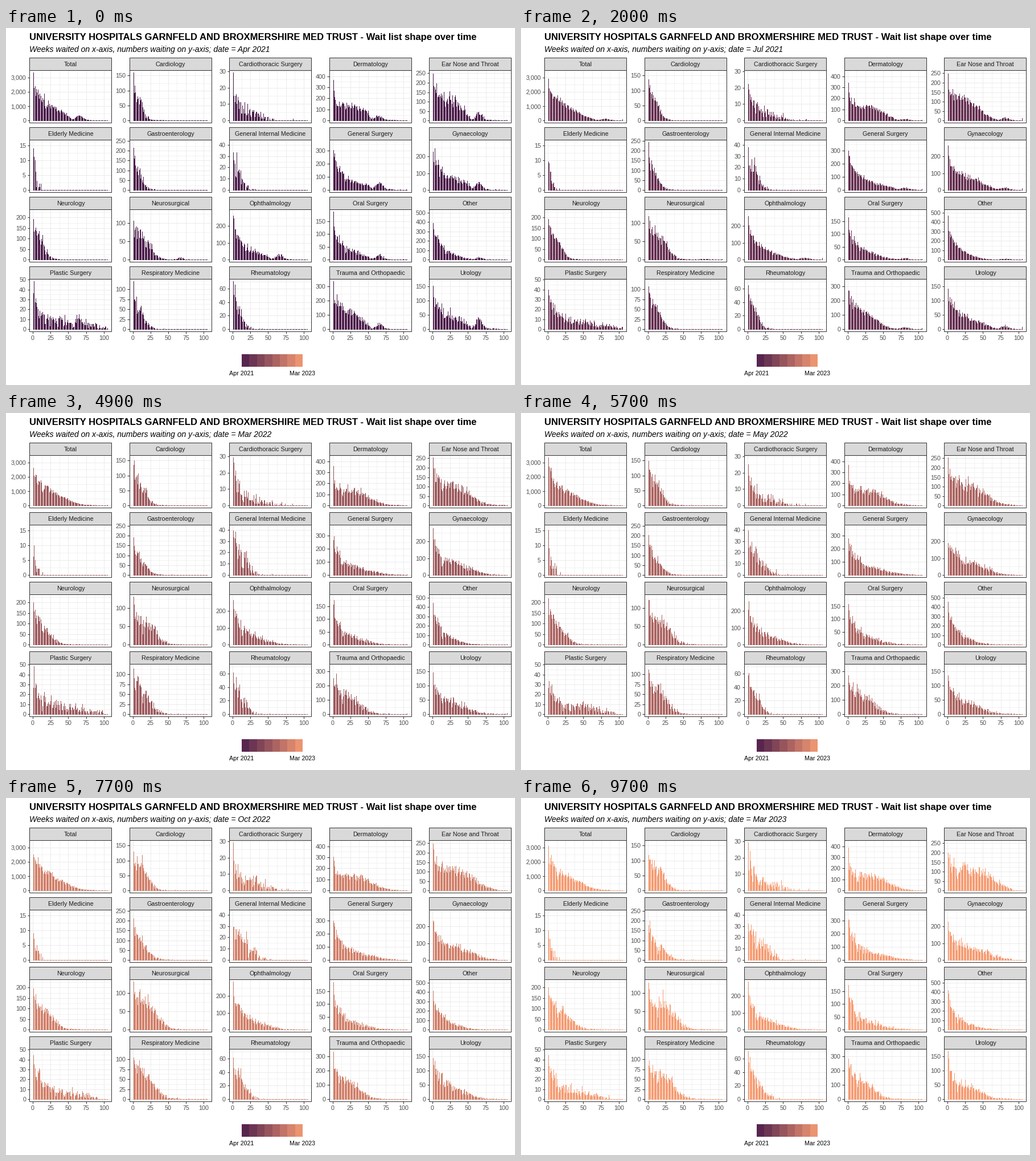
A matplotlib script that plays this animation: 894 px wide and 626 px high, repeating every 10000 ms.

```python
import numpy as np
import matplotlib.pyplot as plt
from matplotlib.animation import FuncAnimation
from matplotlib.collections import LineCollection, PolyCollection
from matplotlib.patches import Rectangle

WIDTH, HEIGHT, DPI = 894, 626, 64
PX = 72 / DPI
FONT = "Liberation Sans"
DARK, LIGHT = np.array([76, 29, 75]) / 255, np.array([246, 156, 115]) / 255
MONTHS = "Jan Feb Mar Apr May Jun Jul Aug Sep Oct Nov Dec".split()
TITLE = ("UNIVERSITY HOSPITALS GARNFELD AND BROXMERSHIRE MED TRUST"
         " - Wait list shape over time")
SUBTITLE = "Weeks waited on x-axis, numbers waiting on y-axis; date = "

PANEL_W, PANEL_H, STRIP_H = 144, 92, 22
WEEK_PX = 1.247
STATES = 24
WEEKS = np.arange(1, 106)
WEEKS_PER_MONTH = 4.345

# The first frame of each change shows the halfway point.
CHANGES = [5, 10, 15, *range(20, 97, 4)]

fig = plt.figure(figsize=(WIDTH / DPI, HEIGHT / DPI), dpi=DPI, facecolor="white")
ax = fig.add_axes([0, 0, 1, 1])
ax.set(xlim=(0, WIDTH), ylim=(HEIGHT, 0))
ax.axis("off")

panels = []
rng = np.random.default_rng(12)


def text(x, y, s, size, color="black", ha="center", **kw):
    return ax.text(x, y, s, fontsize=size * PX, color=color, ha=ha,
                   va="baseline", family=FONT, **kw)


def lines(segments, color, width, z):
    ax.add_collection(LineCollection(segments, colors=color,
                                     linewidths=width * PX, zorder=z), autolim=False)


def box(x, y, w, h, fill, z):
    ax.add_patch(Rectangle((x, y), w, h, facecolor=fill, edgecolor="#333333",
                           linewidth=PX, zorder=z))


def bell(x, width):
    return np.exp(-(x / width) ** 2)


def wait_counts(top, decay, plateau, spans, hump):
    """Counts by month and week; features of a cohort drift right with time."""
    cohort_noise = np.exp(rng.normal(0, 0.12, 230))
    table = []
    for month in range(STATES):
        cohort = WEEKS - WEEKS_PER_MONTH * month
        span = np.interp(month, [0, STATES - 1], spans)
        level = 0.68 * top * (plateau + (1 - plateau) * np.exp(-WEEKS / decay))
        level /= 1 + np.exp((WEEKS - span) / (2 + span / 8))
        level *= 1 + 0.35 * np.exp((1 - WEEKS) / 1.2)
        level *= cohort_noise[np.round(cohort).astype(int) + 110]
        level *= 1 - 0.7 * bell(cohort - 56, 4)
        for december in (-4, 8, 20):
            week = 0.7 + WEEKS_PER_MONTH * (month - december)
            if week > 0:
                fade = np.exp(-max(0, week - 14) / 12)
                level *= 1 - 0.45 * fade * bell(WEEKS - week, 1.3)
        level += hump * top * np.exp(-month / 3.5) * bell(cohort - 66, 6)
        level[-1] += 0.6 * hump * top * bell(month - 6.5, 3)
        level[WEEKS > np.interp(month, [11, 14], [105, 91])] = 0
        table.append(np.minimum(rng.poisson(level), top))
    return np.array(table, float)


def panel(name, top, step, decay, plateau, spans, hump=0):
    row, col = divmod(len(panels), 5)
    x, y = 41 + 175.5 * col, 74 + 122 * row
    bottom = y + PANEL_H
    scale = PANEL_H / 1.1 / top
    zero = bottom - 3.7
    x0 = x + 6

    def across(values):
        return [[(x, zero - v * scale), (x + PANEL_W, zero - v * scale)] for v in values]

    def upright(weeks):
        return [[(x0 + w * WEEK_PX, y), (x0 + w * WEEK_PX, bottom)] for w in weeks]

    ticks = np.arange(0, top * 1.05, step)
    weeks = np.arange(0, 101, 25)
    minor = np.arange(step / 2, top * 1.05, step)
    lines(across(minor) + upright(weeks[:-1] + 12.5), "#EBEBEB", 0.6, 1)
    lines(across(ticks) + upright(weeks), "#EBEBEB", 1, 2)

    box(x, y, PANEL_W, PANEL_H, "none", 4)
    box(x, y - STRIP_H, PANEL_W, STRIP_H, "#D9D9D9", 4)
    text(x + 0.5 + PANEL_W / 2, y - 7, name, 10.75, "#1A1A1A", zorder=5)

    marks = [[(x - 3.5, zero - v * scale), (x, zero - v * scale)] for v in ticks]
    for v in ticks:
        text(x - 6, zero - v * scale + 4, f"{v:,.0f}", 10.75, "#4D4D4D", "right")
    if row == 3:
        for w in weeks:
            wx = x0 + w * WEEK_PX
            marks.append([(wx, bottom), (wx, bottom + 3.5)])
            text(wx, bottom + 15, str(w), 10.75, "#4D4D4D")
    lines(marks, "#333333", 1, 4)
    panels.append((x0, zero, scale, wait_counts(top, decay, plateau, spans, hump)))


# name, highest count, tick step, decay weeks, plateau share, first and last span, hump
panel("Total", 3322, 1000, 24, 0.2, (50, 55), 0.08)
panel("Cardiology", 159, 50, 12, 0.7, (14, 25))
panel("Cardiothoracic Surgery", 29, 10, 10, 0.18, (45, 48))
panel("Dermatology", 431, 100, 3, 0.45, (50, 57), 0.05)
panel("Ear Nose and Throat", 252, 50, 10, 0.62, (43, 66), 0.14)
panel("Elderly Medicine", 16, 5, 5, 0, (10, 13))
panel("Gastroenterology", 242, 50, 14, 0.3, (15, 28))
panel("General Internal Medicine", 42, 10, 10, 0.5, (15, 33))
panel("General Surgery", 363, 100, 16, 0.15, (60, 65), 0.11)
panel("Gynaecology", 281, 100, 12, 0.35, (50, 62), 0.12)
panel("Neurology", 226, 50, 18, 0.4, (18, 36))
panel("Neurosurgical", 130, 50, 10, 0.75, (25, 40), 0.03)
panel("Ophthalmology", 284, 100, 16, 0.15, (50, 55), 0.09)
panel("Oral Surgery", 186, 50, 14, 0.15, (48, 55), 0.08)
panel("Other", 507, 100, 14, 0.1, (40, 45), 0.04)
panel("Plastic Surgery", 48, 10, 12, 0.22, (80, 70), 0.12)
panel("Respiratory Medicine", 119, 25, 12, 0.7, (16, 38))
panel("Rheumatology", 70, 20, 12, 0.6, (14, 22))
panel("Trauma and Orthopaedic", 334, 100, 14, 0.5, (42, 40), 0.11)
panel("Urology", 166, 50, 14, 0.3, (50, 52), 0.18)

text(41, 20.5, TITLE, 16.6, ha="left", weight="bold")
subtitle = text(41, 42, "", 13.95, ha="left", style="italic")

for k in range(8):
    ax.add_patch(Rectangle((414 + k * 13.4, 572), 13.4, 22, linewidth=0,
                           facecolor=DARK + (LIGHT - DARK) * (k + 0.5) / 8))
text(413.5, 609, "Apr 2021", 10.6)
text(521, 609, "Mar 2023", 10.6)

bars = PolyCollection([], antialiaseds=False, linewidths=0, zorder=3)
bars.set_snap(False)
ax.add_collection(bars, autolim=False)


def bar_corners(x0, zero, scale, counts):
    """One-pixel columns on whole pixels, which leaves regular thin gaps."""
    left = np.ceil(x0 + (WEEKS - 0.45) * WEEK_PX)
    top, base = zero - counts * scale, np.full(len(WEEKS), zero + 0.4)
    return np.stack([np.stack([left, base], 1), np.stack([left, top], 1),
                     np.stack([left + 1, top], 1), np.stack([left + 1, base], 1)], 1)


def update(frame):
    after = sum(start <= frame for start in CHANGES)
    before = after - 1 if frame in CHANGES else after
    bars.set_verts(np.concatenate([
        bar_corners(x0, zero, scale, (counts[before] + counts[after]) / 2)
        for x0, zero, scale, counts in panels]))
    progress = (before + after) / 2 / (STATES - 1)
    bars.set_facecolor(DARK + (LIGHT - DARK) * progress)
    year, month = divmod(before + 3, 12)
    subtitle.set_text(f"{SUBTITLE}{MONTHS[month]} {2021 + year}")
    return bars, subtitle


anim = FuncAnimation(fig, update, frames=100, interval=100, repeat=True,
                     repeat_delay=0, init_func=lambda: update(0))
plt.show()
```
